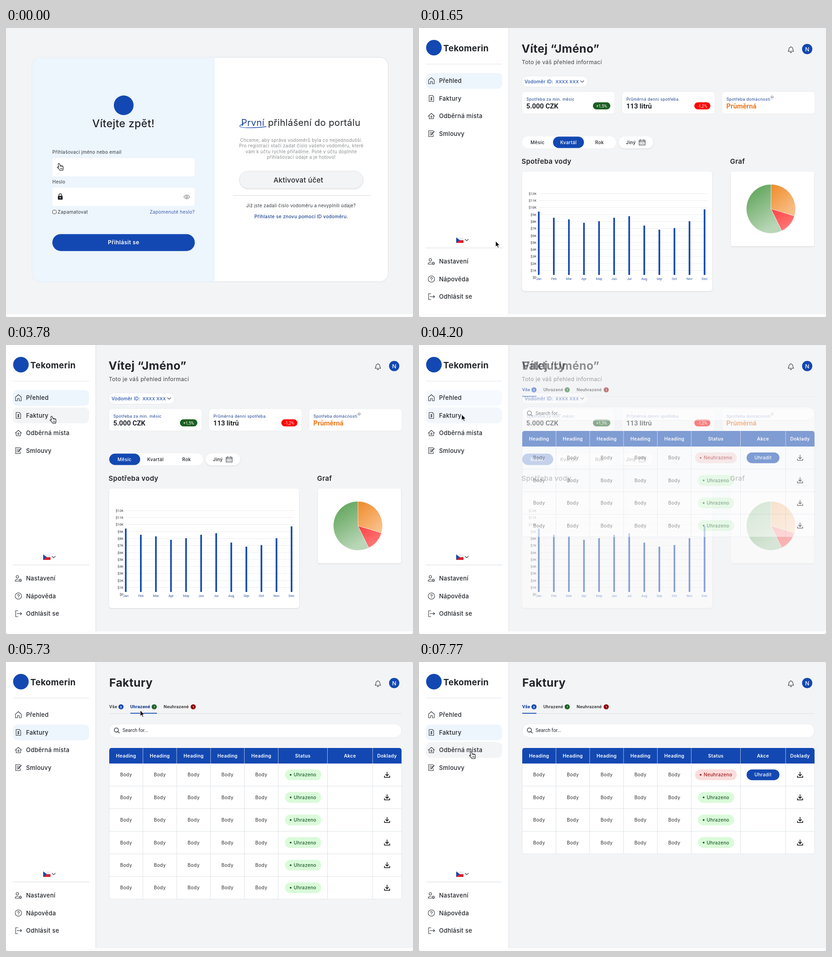
Animation of 887x632 px, one loop 8 s. Source, as an HTML page:

```html
<!DOCTYPE html>
<html lang="cs">
<head>
<meta charset="utf-8">
<title>Portál vodoměrů</title>
<style>
html, body { margin: 0; width: 100%; height: 100%; overflow: hidden; background: #999; }
svg { display: block; font-family: Inter, "Noto Sans", sans-serif; letter-spacing: .02em; }
text { white-space: pre; }
.r { font-family: Roboto, Arial, sans-serif; letter-spacing: 0; }
.tab { font-family: Roboto, Arial, sans-serif; letter-spacing: .03em; font-weight: 500; }
.m { text-anchor: middle; }
.e { text-anchor: end; }
.w5 { font-weight: 450; }
.w6 { font-weight: 600; }
.w7 { font-weight: 700; }
.i { fill: none; stroke: #30343a; stroke-width: 1.1; stroke-linecap: round; stroke-linejoin: round; }
.s { filter: drop-shadow(0 1px 1.2px #0002); }
</style>
</head>
<body>
<svg id="stage" width="887" height="632" viewBox="0 0 887 632"></svg>
<script>
const BLUE = '#1348b2', PALE = '#edf5fd', GREY = '#f3f4f6', INK = '#212429', SOFT = '#33373c';

const text = (x, y, s, size, cls = '', fill = INK, id = '') =>
  `<text x="${x}" y="${y}" font-size="${size}" class="${cls}" fill="${fill}" ${id && `id="${id}"`}>${s}</text>`;
// Box given by its left, top, right and bottom edges
const box = (l, t, r, b, rx, fill, extra = '') =>
  `<rect x="${l}" y="${t}" width="${r - l}" height="${b - t}" rx="${rx}" fill="${fill}" ${extra}/>`;
const dot = (x, y, r, fill) => `<circle cx="${x}" cy="${y}" r="${r}" fill="${fill}"/>`;
const line = (x1, y1, x2, y2, c, w = 1) =>
  `<path d="M${x1} ${y1}L${x2} ${y2}" stroke="${c}" stroke-width="${w}"/>`;
const icon = (x, y, d, extra = '') =>
  `<path class="i" transform="translate(${x} ${y})" d="${d}" ${extra}/>`;
const group = (id, body) => `<g id="${id}">${body}</g>`;
const ring = r => `M${-r} 0a${r} ${r} 0 1 0 ${2 * r} 0a${r} ${r} 0 1 0 ${-2 * r} 0`;
const SHADOW = 'class="s"', CHEVRON = 'M-3.5-1.7L0 1.7 3.5-1.7';

function login() {
  const para = [
    'Chceme, aby správa vodoměrů byla co nejjednodušší.',
    'Pro registraci stačí zadat číslo vašeho vodoměru, které',
    'vám k účtu rychle přiřadíme. Poté v účtu doplníte',
    'přihlašovací údaje a je hotovo!'];
  let dots = '';
  for (let i = 0; i < 8; i++) dots += dot(137.5 + i * 8.1, 370, 2.5, INK);
  return box(57, 64, 833, 555, 18, '#fff', 'stroke="#e9ebec" stroke-width="2"')
    + `<path d="M455 64H75a18 18 0 0 0-18 18V537a18 18 0 0 0 18 18H455z" fill="${PALE}"/>`
    + dot(256.5, 169, 21.5, BLUE)
    + text(256, 217, 'Vítejte zpět!', 23, 'm w5')
    + text(101, 275.3, 'Přihlašovací jméno nebo email', 9.9, '', SOFT)
    + box(101, 284.5, 411, 324.5, 4, '#fff')
    + text(101, 340.3, 'Heslo', 9.9, '', SOFT)
    + box(101, 349, 411, 389, 4, '#fff')
    + box(113, 367, 123.5, 375.5, 1.5, INK)
    + icon(118.2, 367, 'M-3 0V-1.5a3 3 0 0 1 6 0V0', 'style="stroke-width:1.5"') + dot(118.2, 371, 1.2, '#fff')
    + icon(394, 369.5, 'M-6.5 0Q0-8.5 6.5 0Q0 8.5-6.5 0z' + ring(2), 'style="stroke:#777"')
    + group('filled',
      dot(118, 301.3, 2.9, INK) + `<path d="M112.7 311v-2q0-3 5.3-3t5.3 3v2z" fill="${INK}"/>`
      + text(135, 309, 'vorlakempiud@posta.test', 12.4, 'r') + dots)
    + box(101.5, 398.3, 109.5, 406.3, 2.2, '#fff', 'stroke="#444"')
    + text(112.5, 406, 'Zapamatovat', 10.2, '', SOFT)
    + text(411.5, 406, 'Zapomenuté heslo?', 10, 'e', '#3a5cab')
    + box(101, 450.7, 411.5, 487.7, 18.5, BLUE)
    + text(256.3, 473.3, 'Přihlásit se', 12.2, 'm w6', '#fff')
    + text(512.5, 214, 'První', 20.3, '', '#1d4390') + text(571, 214, 'přihlášení do portálu', 20.1)
    + '<path d="M518 210q-9 2-8.5 5t20 3.200q21 0 38-2.700" fill="none" stroke="#1d4fb0" stroke-width="1.3"/>'
    + para.map((s, i) => text(643.5, 249 + i * 12.4, s, 9.8, 'm', '#8b8d90')).join('')
    + box(509, 313, 778, 351, 19, GREY, SHADOW + ' stroke="#e2e4e7"')
    + text(583, 337.5, 'Aktivovat účet', 15.2, 'w5')
    + line(495, 366.3, 793, 366.3, '#d3d5d8')
    + text(643, 392.3, 'Již jste zadali číslo vodoměru a nevyplnili údaje?', 9.75, 'm', SOFT)
    + text(643.5, 416, 'Přihlaste se znovu pomocí ID vodoměru.', 10, 'm w5', '#1d4390');
}

function shell() {
  const nav = [
    ['Přehled', 115.5, 'M-6.3-1.5L0-7 6.3-1.5V6.5H2V1.5H-2V6.5H-6.3z'],
    ['Faktury', 154, 'M-5-6.5H2L5-3.5V6.5H-5zM1.8-1.6C0-3-3-.9 0 .5S0 4-1.8 2.7M0-2.8V4'],
    ['Odběrná místa', 192.5, 'M-7 .3L0-6 7 .3M-4.8-1.5V6H4.8V-1.5M0-.5Q-3 3 0 3.4 3 3 0-.5'],
    ['Smlouvy', 231, 'M4 2V6.5H-6V-6.5H4M-3.5-3H2M-3.5 0H0M-3.5 3H-1M0 3L6.5-4.5M0 3L.5 1 5.5-5.5'],
    ['Nastavení', 510.5, 'M-5-3.5a2.7 2.7 0 1 0 5.4 0a2.7 2.7 0 1 0-5.4 0M0 6H-7V5Q-6 1.6-1 2M2 4a2 2 0 1 0 4 0a2 2 0 1 0-4 0M4 .8V2M4 6V7.3M1 2.5L2.3 3.2M7 2.5L5.7 3.2M1 5.7L2.3 5M7 5.7L5.7 5'],
    ['Nápověda', 549, ring(7) + 'M-2-1.5C-2-4.5 2.5-4 2-1.5 1.7-.3 0 0 0 1.7M0 3.5V3.7'],
    ['Odhlásit se', 587.5, 'M-1-6.5H-6V6.5H-1M-3 0H7M4.5-2.5L7 0 4.5 2.5']];
  const mark = (id, y, fill) => box(15, y - 17.3, 181, y + 17.3, 10, fill, `id="${id}"`);
  return box(-3, 0, 195.5, 626, 0, '#fff') + line(195.8, 0, 195.8, 626, '#dcdee2')
    + dot(32.5, 43, 17, BLUE) + text(53, 51, 'Tekomerin', 18.6, 'w7')
    + line(15, 79, 181, 79, '#dfe3e9') + line(15, 481, 181, 481, '#d6d9de')
    + mark('navHome', 115.7, PALE) + mark('navHover', 154, GREY)
    + mark('navBills', 154, PALE) + mark('navPlaces', 192.5, GREY)
    + nav.map(([s, y, d]) => icon(27, y, d) + text(43.7, y + 4.6, s, 12.9, 'w5')).join('')
    + box(81, 458, 97, 464, 0, '#eceef2') + box(81, 464, 97, 470, 0, '#d8232f')
    + '<path d="M81 458l8 6-8 6z" fill="#2149a0"/>' + icon(104, 463.7, CHEVRON)
    + icon(810.5, 47.5, 'M-6 3.5Q-4.3 1-4.3-1.5a4.3 4.3 0 0 1 8.6 0Q4.3 1 6 3.5zM-1.7 5.5q1.7 1.7 3.4 0M0-7V-6')
    + dot(846, 46, 11.2, BLUE) + text(846.2, 50.5, 'N', 12, 'm w5', '#fff');
}

function dash() {
  const months = 'Jan Feb Mar Apr May Jun Jul Aug Sep Oct Nov Dec'.split(' ');
  const tops = [401.5, 415, 418.5, 426, 422.5, 415, 411.5, 432, 441, 437.5, 422.5, 396.5];
  const stat = (x, label, value, c) => box(x - 10, 139, x + 193, 188, 7, '#fff', 'stroke="#e9ebee"')
    + text(x, 158.5, label, 8.9, '', '#1d4390') + text(x - .3, 175.5, value, 14.8, 'r w7', c);
  const pill = (l, r, s, c) => box(l, 162.5, r, 178, 7.8, c) + text((l + r) / 2, 173.5, s, 9, 'm r', '#fff');
  const at = deg => {
    const a = deg * Math.PI / 180;
    return `${767 + 53.5 * Math.sin(a)} ${395.5 - 53.5 * Math.cos(a)}`;
  };
  const slice = (a, b, fill) =>
    `<path d="M767 395.5L${at(a)}A53.5 53.5 0 ${+(b - a > 180)} 1 ${at(b)}z" fill="url(#${fill})" stroke="#fffa" stroke-width=".8"/>`;
  let chart = '';
  for (let k = 0; k <= 12; k++) {
    const y = 545.6 - k * 15.3;
    if (k) chart += line(261, y, 629, y, '#ebecee');
    chart += text(256, y + 2.7, k ? `$${k}K` : '$0', 7.4, 'e r', SOFT);
  }
  months.forEach((s, i) => {
    const x = 261 + i * 32.85;
    chart += box(x - 1.8, tops[i], x + 1.8, 540, 0, BLUE) + text(x, 550.7, s, 7.3, 'm r', '#2c55a6');
  });
  return text(223.5, 54, 'Vítej “Jméno”', 24.7, 'w7')
    + text(224, 78.7, 'Toto je váš přehled informací', 12.1, '', '#3f4348')
    + box(224, 105, 368, 129, 12, '#fff', 'stroke="#e6e8ec"')
    + text(230, 120.7, 'Vodoměr ID:', 10, 'w5', '#1d4da8') + text(297.5, 120.7, 'XXXX XXX', 9.4, 'w5', '#1d4da8')
    + icon(355.5, 117, CHEVRON)
    + stat(234, 'Spotřeba za min. měsíc', '5.000 CZK', INK) + pill(379, 417, '+1,5%', '#1b5e20')
    + stat(452, 'Průměrná denní spotřeba', '113 litrů', INK) + pill(600, 635, '-1,2%', '#fe0000')
    + stat(670, 'Spotřeba domácnosti', 'Průměrná', '#ee781c')
    + icon(769.7, 151, ring(2.6) + 'M0-.3V1.2', 'style="stroke-width:.6"')
    + box(225, 237, 429, 263, 13, '#fff')
    + group('mHover', box(225, 237.5, 292, 262.5, 12.5, PALE))
    + box(292, 237.5, 359.5, 262.5, 12.5, BLUE, 'id="tabPill"')
    + text(258.3, 253.6, 'Měsíc', 10.1, 'm w5', INK, 'tabM')
    + text(325.7, 253.6, 'Kvartál', 10.1, 'm w5', INK, 'tabQ')
    + text(393.5, 253.6, 'Rok', 10.1, 'm w5')
    + box(435, 237, 510.5, 263.5, 13.2, '#fff', SHADOW) + text(451, 253.6, 'Jiný', 10.1, 'w5')
    + icon(486.3, 250, 'M-6.5-4.5H6.5V6H-6.5zM-6.5-1.5H6.5M-3.5-6V-3.5M3.5-6V-3.5M-3.5 1H-3M0 1H.4M3 1H3.5M-3.5 3.5H-3M0 3.5H.4M3 3.5H3.5')
    + text(223.5, 296.5, 'Spotřeba vody', 14.8, 'w6') + text(678, 296.5, 'Graf', 14.8, 'w6')
    + box(224.5, 314, 639, 575.5, 5, '#fff', SHADOW) + chart
    + box(679.5, 314, 861, 477.5, 4, '#fff', SHADOW)
    + slice(0, 107, 'orange') + slice(107, 154, 'red') + slice(154, 360, 'green');
}

const COLS = [225, 298.4, 372, 445.8, 519.5, 593.3, 700.5, 799, 862];
const mid = i => (COLS[i] + COLS[i + 1]) / 2;

function table(rows) {
  const H = 49.4, end = 222 + rows.length * H, inner = COLS.slice(1, -1);
  let out = box(225, 190, 862, end, 5, '#fff', 'stroke="#e4e6ea"');
  rows.forEach((unpaid, r) => {
    const y = 246.7 + r * H;
    if (r) out += line(225, y - H / 2, 862, y - H / 2, '#dfe1e5');
    for (let i = 0; i < 5; i++) out += text(mid(i), y + 3.6, 'Body', 10.2, 'm', '#2b2e33');
    const [l, w, s, bg, fg] = unpaid
      ? [601.5, 91, 'Neuhrazeno', '#fadddc', '#9b1c1c'] : [608, 79, 'Uhrazeno', '#dafbd9', '#1e5a2a'];
    out += box(l, y - 11.8, l + w, y + 11.8, 11.8, bg) + dot(l + 12.3, y, 1.9, fg)
      + text(l + 19, y + 3.6, s, 10.1, 'w5', fg);
    if (unpaid) out += box(714, y - 11.8, 785.5, y + 11.8, 11.8, BLUE) + text(749.7, y + 3.6, 'Uhradit', 10.1, 'm w5', '#fff');
    out += icon(830.5, y, 'M0-6V2M-3.2-1L0 2.2 3.2-1M-5.8 2.5V5.5H5.8V2.5', 'style="stroke-width:1.5;stroke:#111"');
  });
  inner.forEach(x => out += line(x, 222, x, end, '#dfe1e5'));
  out += `<path d="M225 222V193a5 5 0 0 1 5-5H857a5 5 0 0 1 5 5V222z" fill="${BLUE}"/>`;
  inner.forEach(x => out += line(x, 188, x, 222, '#a9bde6'));
  [...Array(5).fill('Heading'), 'Status', 'Akce', 'Doklady']
    .forEach((s, i) => out += text(mid(i), 208.5, s, 10.3, 'm w6', '#fff'));
  return out;
}

function bills() {
  const tab = (x, s, bx, n, c) => text(x, 101.3, s, 9.7, 'tab')
    + dot(bx, 98, 5.6, c) + text(bx, 100.8, n, 7.5, 'm r', '#fff');
  const active = (x, s, r) => text(x, 101.3, s, 9.7, 'tab', BLUE) + line(x, 112.2, r, 112.2, BLUE, 1.8);
  return text(225, 54, 'Faktury', 24.7, 'w7')
    + line(225, 112.5, 862, 112.5, '#dfe1e8')
    + tab(225, 'Vše', 250.6, 8, BLUE) + tab(271, 'Uhrazené', 323, 7, '#1b5e20') + tab(343.5, 'Neuhrazené', 408, 1, '#8f0606')
    + box(225, 135.5, 862, 165, 14.5, '#fff', 'stroke="#e8eaee"')
    + icon(241, 149.3, 'M-5-.5a4.5 4.5 0 1 0 9 0a4.5 4.5 0 1 0-9 0M2.8 2.7L6 6', 'style="stroke-width:1.4"')
    + text(254, 153.3, 'Search for...', 10.5, 'r')
    + group('all', active(225, 'Vše', 256) + table([1, 0, 0, 0]))
    + group('paid', active(271, 'Uhrazené', 329) + table([0, 0, 0, 0, 0, 0]));
}

const grad = (id, a, b, x2, y2) =>
  `<linearGradient id="${id}" x2="${x2}" y2="${y2}"><stop stop-color="${a}"/><stop offset="1" stop-color="${b}"/></linearGradient>`;
const HAND = 'M-.9.6C0-.3 1.3.2 1.7 1.3L3.1 5.2c.6-.7 1.7-.6 2.1.1.8-.6 1.7-.3 2 .5.9-.5 1.9 0 2.1 1l.5 2.7c.3 2-.2 3-.6 4.5V15.2H2.1c-.3-1.4-1.6-2.6-2.8-4C-1.9 10.4-3.5 9.2-3.2 8.2c.5-1 1.9-.6 3.2.6L-1.3 2.2C-1.5 1.6-1.3 1-.9.6z';

const stage = document.getElementById('stage');
stage.innerHTML = `<defs>${grad('orange', '#ef8a28', '#f9c08a', .7, 1)}${grad('red', '#ff4040', '#ff7a7a', .6, 1)}${grad('green', '#559f4f', '#b9d6b7', .45, 1)}</defs>`
  + box(0, 0, 887, 632, 2.5, '#fdfdfd') + box(0, 0, 887, 626, 2.5, '#f3f4f6')
  + group('login', login()) + group('shell', shell()) + group('dash', dash()) + group('bills', bills())
  + group('cursor',
    `<g id="hand"><path d="${HAND}" fill="#fff" stroke="#111" stroke-width="1.1" stroke-linejoin="round"/>
     <path d="M3.1 5.2l.6 2.5M5.2 5.3l.5 2.4M7.2 5.8l.4 2M3.7 10v3M5.5 10v3M7.3 10v3" stroke="#111" stroke-width=".8"/></g>
     <path id="arrow" d="M0 0V12.5L2.9 9.9 4.9 14.6 6.9 13.7 4.9 9.2H8.8z" fill="#000" stroke="#fff" stroke-width=".9"/>`);

const el = {};
stage.querySelectorAll('[id]').forEach(n => el[n.id] = n);
const fade = (id, a) => { el[id].style.opacity = a; };

// Cursor moves: start, end, target x and y
const MOVES = [
  [420, 1200, 167, 466], [2160, 2940, 265, 253], [3240, 3990, 93, 152],
  [4680, 5280, 302, 107], [5700, 6270, 233, 98], [6960, 7770, 113, 196]];
const HANDS = [[0, 500], [1000, 1300], [2520, 3030], [3640, 4110], [5100, 5430], [6050, 6430], [7350, 8000]];

function draw(t) {
  const ramp = (a, b) => Math.min(1, Math.max(0, (t - a) / (b - a)));
  const ease = (a, b, n = 2) => 1 - (1 - ramp(a, b)) ** n;
  const during = (a, b) => +(t >= a && t < b);

  const enter = ease(1230, 1650), swap = ease(4110, 4410);
  fade('filled', ramp(30, 240));
  fade('login', 1 - enter);
  fade('shell', enter);
  fade('dash', enter * (1 - swap));
  fade('bills', swap);
  fade('navHome', 1 - swap);
  fade('navBills', swap);
  fade('navHover', during(3640, 4410) * (1 - swap));
  fade('navPlaces', during(7350, 8000));

  const month = t >= 3000;
  fade('mHover', during(2520, 3000));
  el.tabPill.setAttribute('x', month ? 225 : 292);
  el.tabM.setAttribute('fill', month ? '#fff' : INK);
  el.tabQ.setAttribute('fill', month ? INK : '#fff');

  const paid = ramp(5400, 5460) * (1 - ramp(6400, 6540));
  fade('paid', paid);
  fade('all', 1 - paid);

  let x = 115, y = 296;
  for (const [a, b, tx, ty] of MOVES) {
    const p = ease(a, b, 2.6);
    x += (tx - x) * p;
    y += (ty - y) * p;
  }
  el.cursor.setAttribute('transform', `translate(${x} ${y})`);
  const hand = +HANDS.some(([a, b]) => during(a, b));
  fade('hand', hand);
  fade('arrow', 1 - hand);
}

const start = performance.now();
(function tick() {
  draw((performance.now() - start) % 8000);
  requestAnimationFrame(tick);
})();
</script>
</body>
</html>
```
